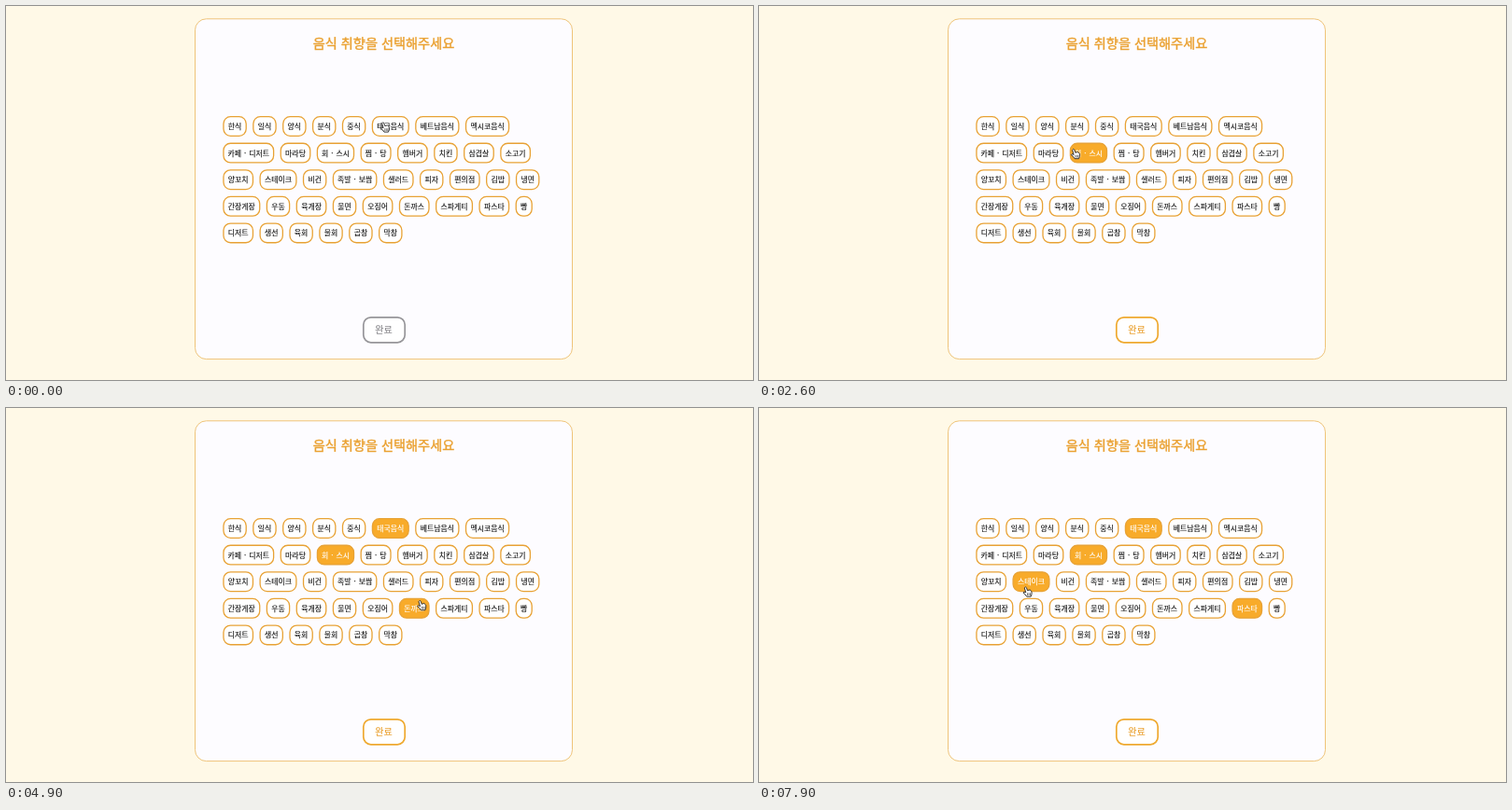
An HTML page for the animation above (8 s loop, 800x401 px).

```html
<!DOCTYPE html>
<html lang="ko">
<head>
<meta charset="utf-8">
<style>
  html, body { margin: 0; height: 100%; overflow: hidden; background: #fff9e7; }
  svg { display: block; width: 800px; height: 401px; }
  text {
    font-family: "Noto Sans CJK KR", "Noto Sans CJK", "Noto Sans KR", sans-serif;
    text-anchor: middle; fill: var(--ink); stroke: var(--ink); stroke-width: .15;
  }
  .title { --ink: #eaa02f; font-size: 14.2px; stroke-width: .4; }
  .chip rect { stroke: #e8a235; stroke-width: 1.3; }
  .chip text { font-size: 7.9px; word-spacing: .8px; }
  .done { --ink: #89888c; --edge: #969599; }
  .done.ready { --ink: #eaa02f; --edge: #efa92f; }
  .done rect { fill: #fff; stroke: var(--edge); stroke-width: 1.7; }
  .done text { font-size: 10px; }
</style>
</head>
<body>
<svg viewBox="0 0 800 401">
  <rect x="202.5" y="13.8" width="404" height="364.8" rx="12" fill="#fdfcff" stroke="#efc479"/>
  <text class="title" x="404.5" y="45.4">음식 취향을 선택해주세요</text>
  <g id="chips"></g>
  <g class="done" id="done">
    <rect x="382.8" y="333.8" width="44.4" height="27" rx="8"/>
    <text x="404.5" y="350.8">완료</text>
  </g>
  <g id="cursor" stroke="#222" stroke-width=".9" stroke-linejoin="round" stroke-linecap="round">
    <path fill="#fff" d="M-1 1Q0-1 1 1L2 4Q5 2 6.5 5Q7 8 5.7 10.5H1.2Q0 8-2.5 6.5Q-2.5 4.5 0 6Z"/>
    <path fill="none" stroke-width=".6" d="M2 7V9M3.5 7V9M5 7V9"/>
  </g>
</svg>
<script>
const LOOP = 8000, FRAME = 100, FADE = 200, MOVE = 800;
const LEFT = 232.3, TOP = 118, ROW_PITCH = 28.6, HEIGHT = 22, BORDER = 1.3;
const GLYPH = 7.27, DOT = 7.6, PADDING = 11, GAP = 6.35;

const rows = [
  '한식,일식,양식,분식,중식,태국음식,베트남음식,멕시코음식',
  '카페 · 디저트,마라탕,회 · 스시,찜 · 탕,햄버거,치킨,삼겹살,소고기',
  '양꼬치,스테이크,비건,족발 · 보쌈,샐러드,피자,편의점,김밥,냉면',
  '간장게장,우동,육개장,울면,오징어,돈까스,스파게티,파스타,빵',
  '디저트,생선,육회,물회,곱창,막창'
];
const selectedAt = { '회 · 스시': 2100, '태국음식': 3800, '파스타': 6700 };

const svgNode = (tag, parent, attrs) => {
  const node = parent.appendChild(document.createElementNS('http://www.w3.org/2000/svg', tag));
  for (const key in attrs) node.setAttribute(key, attrs[key]);
  return node;
};

const chips = rows.flatMap((row, index) => {
  let x = LEFT;
  const y = TOP + index * ROW_PITCH;
  return row.split(',').map(label => {
    const glyphs = label.replace(' · ', '').length;
    const width = glyphs * GLYPH + (label.includes('·') ? DOT : 0) + PADDING;
    const group = svgNode('g', document.getElementById('chips'), { class: 'chip' });
    const box = svgNode('rect', group, {
      x: x + BORDER / 2, y: y + BORDER / 2, width: width - BORDER, height: HEIGHT - BORDER, rx: 7.5
    });
    const text = svgNode('text', group, { x: x + width / 2, y: y + 13.9 });
    text.textContent = label;
    const chip = { label, x, y, width, group, box, selected: selectedAt[label] ?? Infinity };
    x += width + GAP;
    return chip;
  });
});

// Where the pointer rests: a chip, a place inside it (0 to 1) and the arrival time.
const stop = (label, u, v, arrive) => {
  const chip = chips.find(c => c.label === label);
  return { x: chip.x + u * chip.width, y: chip.y + v * HEIGHT, arrive };
};
const stops = [
  stop('태국음식', .3, .3, 0),
  stop('회 · 스시', .1, .3, 1400),
  stop('태국음식', .4, .95, 3800),
  stop('돈까스', .75, .15, 4700),
  stop('족발 · 보쌈', .91, .54, 5600),
  stop('파스타', .42, .7, 6600),
  stop('스테이크', .35, .75, 7600)
];

function pointerAt(t) {
  let { x, y } = stops[0];
  for (const next of stops.slice(1)) {
    const u = Math.min(1, Math.max(0, (t - next.arrive) / MOVE + 1));
    const ease = u * u * (3 - 2 * u);
    x += (next.x - x) * ease;
    y += (next.y - y) * ease;
  }
  return [x, y];
}

const mix = (a, b, u) => `rgb(${a.map((v, i) => Math.round(v + (b[i] - v) * u))})`;
const WHITE = [255, 255, 255], ORANGE = [248, 171, 42], BLACK = [25, 25, 25];
const done = document.getElementById('done');
const cursor = document.getElementById('cursor');

function draw(t) {
  // Hover colour is the share of recent moments the pointer spent on the chip.
  const trail = [];
  for (let ago = 0; ago < FADE; ago += 20) if (t > ago) trail.push(pointerAt(t - ago));
  for (const chip of chips) {
    const hits = trail.filter(([x, y]) =>
      x >= chip.x && x <= chip.x + chip.width && y >= chip.y && y <= chip.y + HEIGHT).length;
    const level = t >= chip.selected ? 1 : hits * 20 / FADE;
    chip.box.setAttribute('fill', mix(WHITE, ORANGE, level));
    chip.group.style.setProperty('--ink', mix(BLACK, WHITE, level));
  }
  done.classList.toggle('ready', chips.some(chip => t >= chip.selected));
  cursor.setAttribute('transform', `translate(${pointerAt(t)})`);
}

const start = performance.now();
function tick() {
  const t = (performance.now() - start) % LOOP;
  draw(Math.floor(t / FRAME) * FRAME);
  requestAnimationFrame(tick);
}
tick();
</script>
</body>
</html>
```
